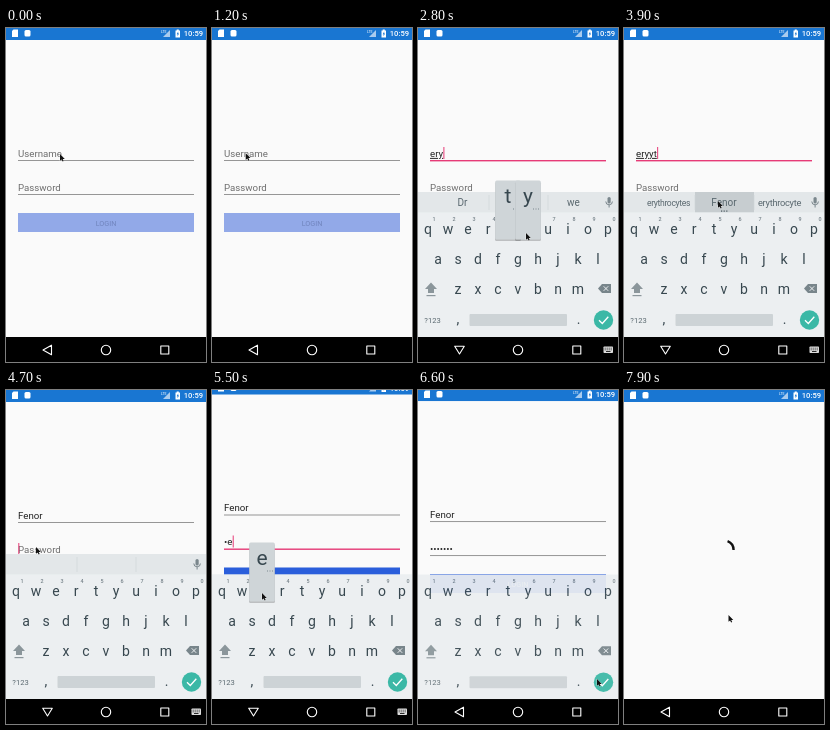
Write an HTML page that moves like this. It is 200 by 334 pixels and loops after 8000 ms.

```html
<!DOCTYPE html>
<html lang="en">
<head>
<meta charset="utf-8">
<title>Login</title>
<style>
html, body { margin: 0; width: 100%; height: 100%; overflow: hidden; background: #000; }
svg { display: block; width: 100vw; height: 100vh; font-family: Roboto, "Noto Sans", sans-serif; }
text { white-space: pre; }
.mid { text-anchor: middle; }
</style>
</head>
<body>
<svg id="stage" viewBox="0 0 200 334"></svg>
<script>
const LOOP = 8000, PINK = "#e63b77", INK = "#37474f", RULE = "#969696";
const svg = document.getElementById("stage");

const rect = (x, y, w, h, fill, more = "") =>
  `<rect x="${x}" y="${y}" width="${w}" height="${h}" fill="${fill}" ${more}/>`;
const label = (s, x, y, size, fill, more = "") =>
  `<text x="${x}" y="${y}" font-size="${size}" fill="${fill}" ${more}>${s}</text>`;
const path = (d, more) => `<path d="${d}" ${more}/>`;
const mid = 'class="mid"';

// Keyboard layout: key centres
const keys = {};
[["qwertyuiop", 10, 205.5], ["asdfghjkl", 20, 236], ["zxcvbnm", 40, 266]].forEach(([row, x, y]) =>
  [...row].forEach((c, i) => keys[c] = { x: x + 20 * i, y }));

function field(id, hint, y) {
  return label(hint, 12, y - 3.6, 9.7, "#6e6e6e", `id="${id}Hint"`) +
    label("", 12, y - 3.6, 9.7, "#222", `id="${id}Text"`) +
    rect(12, y - .5, 176, 1, RULE, `id="${id}Line"`) +
    rect(12, y - 13.5, 1, 12, PINK, `id="${id}Caret"`);
}

function statusBar() {
  return rect(0, 0, 200, 12, "#1976d2") +
    path("M7.5 1.5H12V9H6V3Z", 'fill="#fff"') +
    rect(18.5, 2, 6, 6.5, "#fff", 'rx="1.5"') +
    path("M164 2V9H157Z", 'fill="#a9cbee"') +
    label("LTE", 155, 5, 3.6, "#fff") +
    path("M170.7 1.5H172.8V2.4H174V9.4H169.5V2.4H170.7Z", 'fill="#fff"') +
    path("M172.2 3.5L170.7 6.3H171.6V8.3L173 5.5H172.2Z", 'fill="#1976d2"') +
    label("10:59", 177.8, 8.4, 7.6, "#fff", 'font-weight="500"');
}

// The keyboard window also carries the black area behind the navigation icons
function keyboard() {
  let out = `<g id="strip">${rect(0, 164, 200, 22, "#e3e7e9")}
    ${rect(71, 164, 59, 21, "#c7cdd0", 'id="picked"')}
    ${rect(70.7, 167, .6, 15, "#cdd3d6")}${rect(129.7, 167, .6, 15, "#cdd3d6")}
    <g id="words"></g>
    ${rect(189.5, 169, 3.2, 6.5, "#7b878d", 'rx="1.6"')}
    ${path("M187.8 173.5a3.3 3.3 0 0 0 6.6 0M191.1 177V179.5", 'fill="none" stroke="#7b878d"')}</g>`;
  out += rect(0, 184.3, 200, 124.7, "#eceff1") + rect(0, 309, 200, 25, "#000");
  for (const c in keys) out += label(c, keys[c].x, keys[c].y, 14, INK, mid);
  [..."1234567890"].forEach((n, i) =>
    out += label(n, 16 + 20 * i, 193, 5.4, "#77838a", mid + ' font-weight="500"'));
  out += path("M13 254.5L19 261H16V265H10V261H7Z", 'fill="#8b969b"') + rect(8.5, 267, 9, 1.2, "#8b969b") +
    path("M180 260.5L184 256H193V265H184Z", 'fill="#78858b"') +
    path("M185.7 258.3L190.2 262.8M190.2 258.3L185.7 262.8", 'stroke="#eceff1"') +
    label("?123", 14.5, 294.8, 7.6, "#5c6a71", mid) +
    label(",", 40, 295.5, 14, INK, mid) + label(".", 160.5, 295.5, 14, INK, mid) +
    rect(51.5, 286, 97.5, 12, "#cdd3d6", 'rx="1"') +
    '<circle cx="185.5" cy="292" r="9.7" fill="#3bb8a6"/>' +
    path("M181 292.3L184.3 295.5L190.3 288.8", 'fill="none" stroke="#fff" stroke-width="1.3"');
  return out;
}

function navIcons() {
  let icon = rect(185.5, 318.5, 9.5, 6.5, "#ddd", 'rx=".8"');
  for (let i = 0; i < 8; i++)
    icon += rect(186.7 + (i % 4) * 2, 319.7 + (i >> 2) * 1.7, .9, .9, "#000");
  icon += rect(188, 323.2, 4.5, .8, "#000");
  const line = 'fill="none" stroke="#fff" stroke-width="1.1" stroke-linejoin="round"';
  return path("M37 322L45.5 317.2V326.8Z", line + ' id="back"') +
    path("M36.7 318.3H46.3L41.5 326Z", line + ' id="down"') +
    `<circle cx="100" cy="322" r="4.7" ${line}/>` +
    `<rect x="154.8" y="318" width="8" height="8" ${line}/><g id="ime">${icon}</g>`;
}

svg.innerHTML = rect(0, 0, 200, 334, "#fafafa") +
  `<g id="page">${statusBar()}<g id="form">` +
  field("user", "Username", 132.5) + field("pass", "Password", 166.5) +
  rect(12, 185, 176, 19, "#2a5edb", 'id="button"') +
  label("LOGIN", 100, 197.6, 7.2, "#fff", 'id="login" class="mid"') + "</g></g>" +
  path("M103.5 151.2A9.6 9.6 0 0 1 109.6 160", 'id="spinner" fill="none" stroke="#111" stroke-width="2.4"') +
  rect(0, 309, 200, 25, "#000") +
  `<g id="board">${keyboard()}</g><g id="popups"></g>${navIcons()}` +
  path("M0 0V6.8L1.6 5.4L2.6 7.6L3.7 7.1L2.7 4.9H4.8Z",
    'id="mouse" fill="#111" stroke="#fff" stroke-width=".5" paint-order="stroke"');

const ui = {};
svg.querySelectorAll("[id]").forEach(n => ui[n.id] = n);

// [time, value] steps
const userSteps = [[1600, ""], [2450, "e"], [2600, "er"], [2780, "ery"], [3150, "eryy"], [3450, "eryyt"], [4000, "Fenor"]];
const passSteps = [[4700, ""], [5280, "w"], [5460, "•e"], [5620, "••r"], [5740, "•••e"], [5860, "••••w"],
  [5980, "•••••e"], [6100, "••••••r"], [6400, "•••••••"]];
const wordSteps = [[0, []], [2450, ["Dr", "we", "we"]], [2600, ["Dr", "er", "we"]],
  [3150, ["erythrocytes", "eryy", "erythrocyte"]], [3450, ["erythrocytes", "Fenor", "erythrocyte"]], [4000, []]];
const presses = [["e", 2400, 2550], ["r", 2560, 2690], ["t", 2680, 2850], ["y", 2730, 2890], ["y", 3100, 3230],
  ["t", 3400, 3530], ["w", 5230, 5360], ["e", 5420, 5570], ["r", 5580, 5700], ["e", 5700, 5820],
  ["w", 5820, 5940], ["e", 5940, 6060], ["r", 6060, 6180]];
const moves = [[200, 54, 126], [700, 53, 126], [1400, 29, 125], [1950, 29, 125], [2350, 50, 203], [2450, 50, 203],
  [2600, 71, 204], [2780, 108, 205], [3200, 108, 205], [3400, 89, 204], [3500, 89, 204], [3800, 94, 173],
  [4250, 94, 173], [4650, 30, 157], [4800, 30, 157], [5230, 31, 203], [5420, 50, 203], [5540, 50, 203],
  [5620, 69, 203], [5740, 50, 203], [5860, 31, 203], [5980, 50, 203], [6080, 69, 203], [6400, 179, 289],
  [6700, 179, 289], [7400, 102, 196], [7700, 102, 196], [7880, 104.5, 225]];

const clamp = v => Math.max(0, Math.min(1, v));
const span = (t, a, b) => clamp((t - a) / (b - a));
const ease = p => p * p * (3 - 2 * p);
const last = (steps, t) => steps.filter(s => s[0] <= t).pop();
const show = (node, on) => node.style.display = on ? "" : "none";
const shift = (node, x, y) => node.setAttribute("transform", `translate(${x} ${y})`);

function mouseAt(t) {
  const i = moves.findIndex(m => m[0] > t);
  if (i < 0) return moves[moves.length - 1].slice(1);
  const b = moves[i], a = moves[i - 1] || b, p = ease(span(t, a[0], b[0]));
  return [a[1] + (b[1] - a[1]) * p, a[2] + (b[2] - a[2]) * p];
}

function setField(id, steps, t, focused) {
  const [since, value] = last(steps, t) || [0, ""];
  const text = ui[id + "Text"], line = ui[id + "Line"], caret = ui[id + "Caret"];
  if (text.textContent !== value) text.textContent = value;
  show(ui[id + "Hint"], !value);
  line.setAttribute("fill", focused ? PINK : RULE);
  line.setAttribute("height", focused ? 1.4 : 1);
  show(caret, focused && (t - since) % 1000 < 500);
  caret.setAttribute("x", 12 + (value ? text.getComputedTextLength() + .3 : .3));
  return value;
}

function popup([c]) {
  const { x } = keys[c];
  return rect(x - 13, 154, 26, 59, "#000", 'rx="1.5" opacity=".2"') +
    rect(x - 12.8, 152.5, 25.6, 59, "#cfd5d8", 'rx="1.5"') +
    label(c, x, 174.5, 21, INK, mid) +
    [5, 7.5, 10].map(d => rect(x + d, 180.5, 1, 1, "#7b878d")).join("");
}

function words(list) {
  return list.map((w, i) => {
    const [size, gap] = w.length > 11 ? [8.6, -.36] : w.length > 6 ? [9.3, -.3] : [10, 0];
    return label(w, [44.5, 100, 155.5][i], 178, size, "#5a686f", `${mid} letter-spacing="${gap}"`);
  }).join("") + (list.length ? [97, 99.6, 102.2].map(x => rect(x, 182.5, 1.2, 1.2, "#4b5960")).join("") : "");
}

function render(t) {
  const onUser = t >= 1600 && t < 4700, onPass = t >= 4700 && t < 6500;
  setField("user", userSteps, t, onUser);
  const enabled = setField("pass", passSteps, t, onPass) !== "";
  ui.userText.setAttribute("text-decoration", t < 4000 ? "underline" : "none");
  ui.button.setAttribute("fill", enabled ? "#2a5edb" : "#92a9e8");
  ui.login.setAttribute("fill", enabled ? "#fff" : "#7084bd");

  shift(ui.page, 0, -7.5 * (ease(span(t, 4720, 4900)) - ease(span(t, 6500, 6630))));
  show(ui.form, t < 7700);
  show(ui.spinner, t >= 7700);
  ui.spinner.setAttribute("transform", `rotate(${(t - 7900) * .36} 100 160)`);

  // Keyboard rises and fades in, later sinks and fades out
  const rise = 1 - (1 - span(t, 1800, 2100)) ** 3, sink = span(t, 6580, 6880);
  ui.board.setAttribute("opacity", rise * (1 - sink));
  shift(ui.board, 0, 40 * (1 - rise + sink * sink));
  show(ui.board, rise > 0 && sink < 1);
  show(ui.strip, t < 4750);
  show(ui.picked, t >= 3850 && t < 4000);
  ui.words.innerHTML = words(last(wordSteps, t)[1]);
  ui.popups.innerHTML = presses.filter(p => t >= p[1] && t < p[2]).map(popup).join("");

  const ime = t >= 1750 && t < 6550;
  show(ui.ime, ime);
  show(ui.down, ime);
  show(ui.back, !ime);
  shift(ui.mouse, ...mouseAt(t));
}

const start = performance.now();
function tick() {
  render((performance.now() - start) % LOOP);
  requestAnimationFrame(tick);
}
tick();
</script>
</body>
</html>
```
